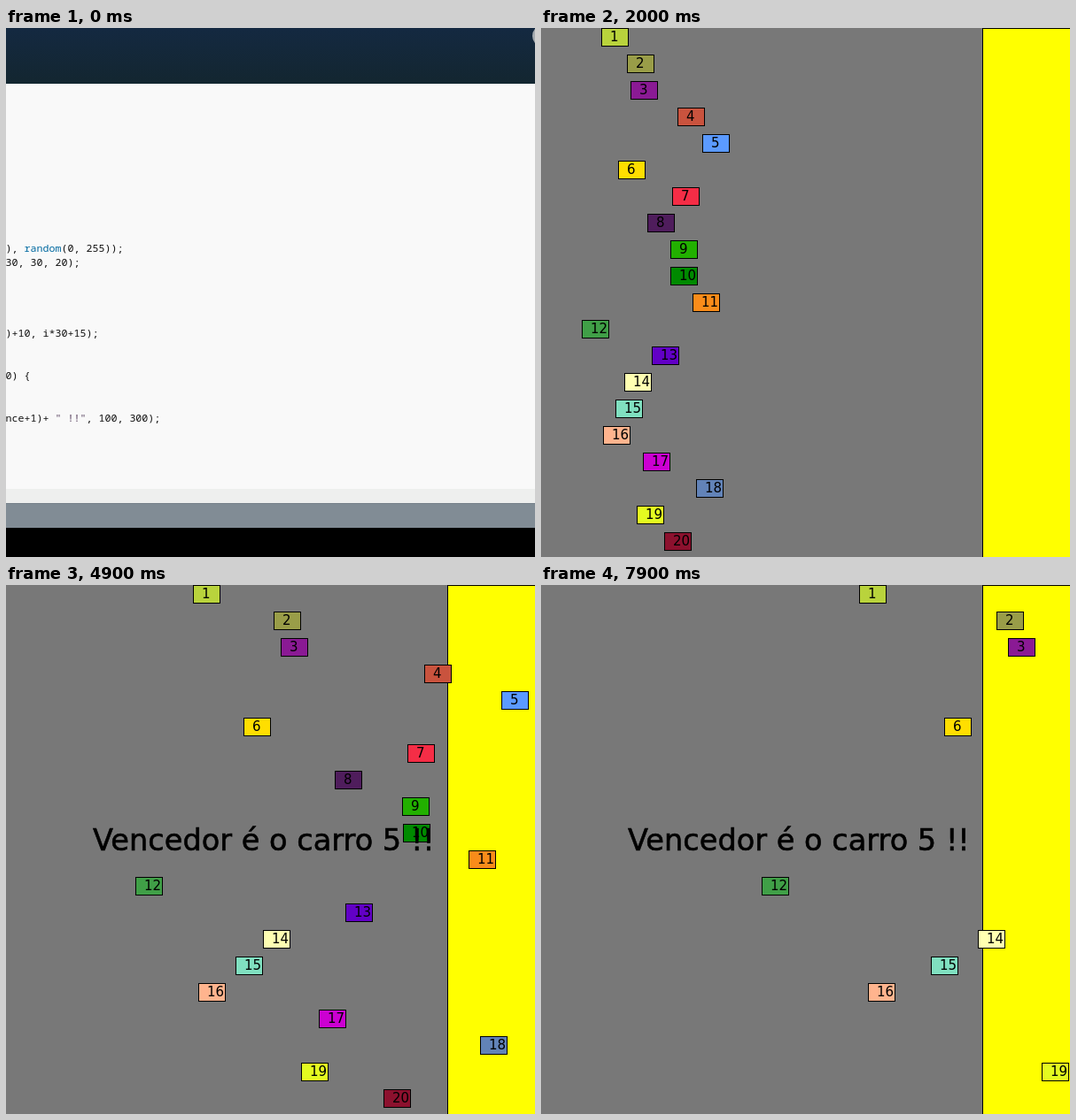
These frames come from a looping animation (597 by 598 pixels, 8000 ms). An HTML page with a canvas:

```html
<!DOCTYPE html>
<html lang="pt">
<head>
<meta charset="utf-8">
<title>Corrida</title>
<style>
  html, body { margin: 0; width: 100%; height: 100%; overflow: hidden; background: #787878; }
  canvas { display: block; }
</style>
</head>
<body>
<canvas id="stage" width="597" height="598"></canvas>
<script>
const ctx = document.getElementById('stage').getContext('2d');
const LOOP = 8000, TICK = 100;
const RACE_START = 500, REFERENCE = 1300, WIN_TIME = 4500;
const START_X = -2, FINISH_X = 498;

// [x at REFERENCE, pixels per tick, colour]
const cars = [
  [33, 4.94, '#b9d33c'], [48, 7.06, '#999d48'], [50, 7.23, '#8a1a94'], [77, 10.96, '#c9533e'],
  [91, 13, '#5b9aff'], [43, 6.24, '#ffde00'], [74, 10.53, '#f52d46'], [60, 8.64, '#4f1d5c'],
  [73, 10.38, '#22b000'], [73, 10.42, '#008a00'], [86, 12.11, '#f98c1a'], [22, 3.44, '#409f47'],
  [63, 8.89, '#6200c6'], [47, 6.76, '#ffffb2'], [42, 6.03, '#80e0c0'], [35, 5.06, '#ffb48e'],
  [58, 8.2, '#cc00d2'], [88, 12.42, '#6283b8'], [54, 7.74, '#e4fb20'], [70, 9.89, '#8c112e']
];

function fillRect(x, y, w, h, color) {
  ctx.fillStyle = color;
  ctx.fillRect(x, y, w, h);
}

function outlinedRect(x, y, w, h, color) {
  fillRect(x, y, w + 1, h + 1, '#000');
  fillRect(x + 1, y + 1, w - 1, h - 1, color);
}

// Each part is [text, colour]; parts follow one another on the line.
function codeLine(y, ...parts) {
  let x = -0.5;
  for (const [text, color = '#111'] of parts) {
    ctx.fillStyle = color;
    ctx.fillText(text, x, y);
    x += ctx.measureText(text).width;
  }
}

function drawEditor() {
  const header = ctx.createLinearGradient(0, 0, 0, 63);
  header.addColorStop(0, '#142941');
  header.addColorStop(1, '#132630');
  fillRect(0, 0, 597, 63, header);
  ctx.fillStyle = '#a5abb0';
  ctx.beginPath();
  ctx.arc(607, 9, 13, 0, 7);
  ctx.fill();

  fillRect(0, 63, 597, 458, '#f9f9f9');
  fillRect(0, 521, 597, 16, '#eeefee');
  fillRect(0, 537, 597, 28, '#818c95');
  fillRect(0, 537, 597, 1, '#76818a');
  fillRect(0, 565, 597, 33, '#000');

  ctx.font = '11.67px "Noto Sans Mono", monospace';
  codeLine(253, ['), '], ['random', '#0069a0'], ['(0, 255));']);
  codeLine(269, ['30, 30, 20);']);
  codeLine(349, [')+10, i*30+15);']);
  codeLine(397, ['0) {']);
  codeLine(445, ['nce+1)+ '], ['" !!"', '#5f4a66'], [', 100, 300);']);
}

function drawRace(time) {
  fillRect(0, 0, 597, 598, '#787878');
  outlinedRect(FINISH_X, 0, 100, 600, '#ff0');

  ctx.font = '15px "DejaVu Sans", sans-serif';
  const ticks = (time - REFERENCE) / TICK;
  cars.forEach(([x0, speed, color], i) => {
    const x = Math.max(START_X, Math.round(x0 + speed * ticks));
    const y = i * 30;
    outlinedRect(x, y, 30, 20, color);
    ctx.fillStyle = '#000';
    ctx.fillText(i + 1, x + 10, y + 15);
  });

  if (time >= WIN_TIME) {
    const message = 'Vencedor é o carro 5 !!';
    ctx.font = '33.6px "DejaVu Sans", sans-serif';
    ctx.strokeStyle = '#000';
    ctx.lineWidth = 0.6;
    ctx.fillText(message, 98, 300);
    ctx.strokeText(message, 98, 300);
  }
}

function frame() {
  const time = Math.floor((performance.now() % LOOP) / TICK) * TICK;
  if (time < RACE_START) drawEditor();
  else drawRace(time);
  requestAnimationFrame(frame);
}
frame();
</script>
</body>
</html>
```
